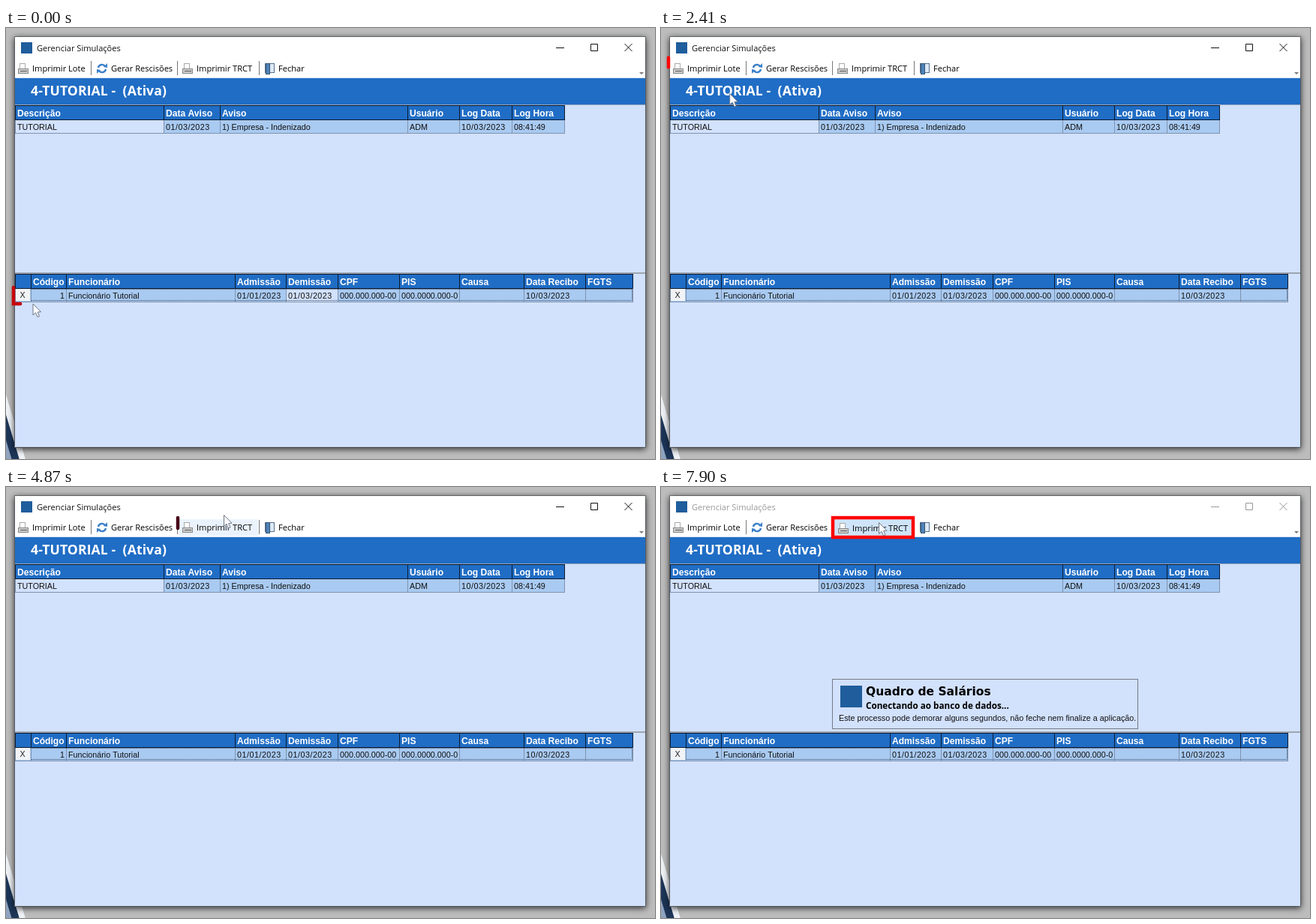
These frames come from a looping animation (865x575 px, 8000 ms). An HTML page with a canvas:

```html
<!DOCTYPE html>
<html lang="pt-BR">
<head>
<meta charset="utf-8">
<style>
html, body { margin: 0; width: 100%; height: 100%; overflow: hidden; background: #bbb }
canvas { display: block }
</style>
</head>
<body>
<canvas id="stage" width="865" height="575"></canvas>
<script>
const ctx = document.getElementById('stage').getContext('2d');
const W = 865, H = 575, LOOP = 8000, DRAW_TIME = 1060, DIALOG_AT = 7690;
const PALE = '#d2e1fc', BLUE = '#206dc5', ROW = '#a9caf1', LOGO = '#1f5d9c';
const UI = '11.1px "Open Sans", sans-serif';
const CELL = '10.75px "Liberation Sans", Arial, sans-serif';
const HEAD = 'bold 12.1px "Liberation Sans", Arial, sans-serif';

// Heading, column width, value
const NOTICE = [
  ['Descrição', 198, 'TUTORIAL'], ['Data Aviso', 75, '01/03/2023'],
  ['Aviso', 250, '1) Empresa - Indenizado'], ['Usuário', 69, 'ADM'],
  ['Log Data', 70, '10/03/2023'], ['Log Hora', 70, '08:41:49']
];
const STAFF = [
  ['', 21, ''], ['Código', 47, '1'], ['Funcionário', 225, 'Funcionário Tutorial'],
  ['Admissão', 68, '01/01/2023'], ['Demissão', 69, '01/03/2023'],
  ['CPF', 82, '000.000.000-00'], ['PIS', 80, '000.0000.000-0'], ['Causa', 86, ''],
  ['Data Recibo', 82, '10/03/2023'], ['FGTS', 63, '']
];

// Pointer tip: start, duration, destination
const MOVES = [
  [910, 270, 30, 346], [2090, 470, 98, 58], [3330, 270, 89, 57],
  [4190, 70, 87, 69], [4800, 1, 290, 37], [5000, 570, 290, 47]
];

const POINTER = new Path2D('M.5.5v15l3.5-3.2 2.5 5.7 2.5-1-2.3-5.5 4.3-.3z');

const clamp = v => Math.max(0, Math.min(1, v));
const progress = (t, start, duration) => clamp((t - start) / duration);
const bold = size => `bold ${size}px "Open Sans", sans-serif`;

function rect(x, y, w, h, fill) {
  ctx.fillStyle = fill;
  ctx.fillRect(x, y, w, h);
}

function panel(x, y, w, h, fill, border) {
  rect(x, y, w, h, border);
  rect(x + 1, y + 1, w - 2, h - 2, fill);
}

function stroke(path, color, width = 1) {
  ctx.strokeStyle = color;
  ctx.lineWidth = width;
  ctx.stroke(new Path2D(path));
}

function text(str, x, y, font, color = '#000', spacing = 0) {
  ctx.font = font;
  ctx.letterSpacing = spacing + 'px';
  ctx.fillStyle = color;
  ctx.fillText(str, x, y);
  return ctx.measureText(str).width;
}

function backdrop() {
  rect(0, 0, W, H, '#bcbcbc');
  [['#eef1f5', 489], ['#1d3557', 516], ['#8fa3bf', 550]].forEach(([color, y]) => {
    ctx.fillStyle = color;
    ctx.fill(new Path2D(`M0 ${y}L${(H - y) * 0.3} ${H}H0z`));
  });
  ctx.save();
  ctx.shadowColor = 'rgba(0,0,0,.45)';
  ctx.shadowBlur = 8;
  ctx.shadowOffsetY = 2;
  panel(11, 11, 842, 549, PALE, '#6d7278');
  ctx.restore();
  rect(12, 12, 840, 547, PALE);
  rect(12, 12, 840, 54, '#fff');
}

function titleBar(inactive) {
  const ink = inactive ? '#999' : '#111';
  rect(20, 19, 15, 15, LOGO);
  text('Gerenciar Simulações', 41, 31, UI, ink);
  stroke('M733 26.5h11M779.5 21.5h9v9h-9zM824.5 21l10 10m0-10l-10 10', ink);
}

function printer(x, y) {
  panel(x + 2, y, 8, 9, '#fff', '#aaa');
  panel(x, y + 7, 14, 7, '#ccc', '#888');
  rect(x + 3, y + 10, 9, 1, '#555');
}

function refreshIcon() {
  for (const turn of [0, Math.PI]) {
    ctx.save();
    ctx.translate(128, 54);
    ctx.rotate(turn);
    stroke('M-5 -1A5 5 0 0 1 4 -3', '#3b7fc8', 2.4);
    ctx.fillStyle = '#3b7fc8';
    ctx.fill(new Path2D('M2 -2l5 -5v6z'));
    ctx.restore();
  }
}

function toolbar([x, y], pressed) {
  const push = pressed ? 1 : 0;
  if (y < 66) {
    if (x < 114) rect(13, 43, 100, 22, '#f2f7fd');
    else rect(231, 43, 105, 22, pressed ? '#cfe4f8' : '#eaf3fd');
  }
  printer(16, 47);
  text('Imprimir Lote', 35, 58, UI);
  refreshIcon();
  text('Gerar Rescisões', 140, 58, UI);
  printer(235 + push, 47 + push);
  text('Imprimir TRCT', 254 + push, 58 + push, UI);
  panel(345, 47, 13, 13, '#dce9f5', '#58718d');
  panel(346, 47, 6, 15, '#4e83b9', '#3a5674');
  text('Fechar', 363, 58, UI);
  [113, 228, 337].forEach(s => rect(s, 44, 1, 19, '#777'));
  ctx.fill(new Path2D('M844 59h6l-3 3z'));
}

function cell(str, x, y, width, struck) {
  const ink = struck ? '#d8485c' : '#111';
  const left = str === '1' ? x + width - 9 : x + 2;
  const length = text(str, left, y, CELL, ink, str.includes('/') ? 0.5 : 0);
  if (struck) rect(left, y - 4, length, 1, ink);
}

function table(columns, top, paleHead, struck) {
  const total = columns.reduce((sum, c) => sum + c[1], 0);
  rect(12, top - 1, total + 1, 20, '#0b1a30');
  rect(12, top + 19, total + 1, 18, '#7f93af');
  let x = 13;
  for (const [head, width, value] of columns) {
    rect(x, top, width - 1, 18, BLUE);
    rect(x, top + 19, width - 1, 17, head === paleHead ? PALE : ROW);
    text(head, x + 2, top + 14, HEAD, '#fff');
    cell(value, x, top + 32, width, struck);
    x += width;
  }
}

function staffTable(t) {
  const struck = t >= 560 && t < 1450;
  table(STAFF, 329, t < 560 ? 'Demissão' : null, struck);
  rect(13, 348, 19, 16, '#f1f3f6');
  text('X', 18.5, 360, struck ? HEAD : CELL, '#222');
  ctx.setLineDash([1, 1]);
  stroke('M33 348.5H834.5V363.5H33', '#33445c');
  ctx.setLineDash([]);
}

function dialog() {
  panel(228, 256, 408, 67, PALE, '#737b88');
  rect(239, 265, 29, 29, LOGO);
  text('Quadro de Salários', 273, 278, 'bold 15.5px "DejaVu Sans", sans-serif');
  text('Conectando ao banco de dados...', 273, 296, bold(11.7));
  text('Este processo pode demorar alguns segundos, não feche nem finalize a aplicação.',
    237, 312, CELL, '#111');
}

// A red outline that draws itself counterclockwise from its top left corner.
function highlight(t, x, y, w, h, start, fadeStart, fadeTime, startInk) {
  if (t < start) return;
  const p = progress(t, start, DRAW_TIME);
  const length = 2 * (w + h);
  const glow = clamp(startInk + p * 2);
  ctx.save();
  ctx.globalAlpha = 1 - progress(t, fadeStart, fadeTime);
  if (p < 1) {
    ctx.lineCap = 'round';
    ctx.setLineDash([p * length, length * 2]);
  }
  stroke(`M${x} ${y}v${h}h${w}v${-h}z`, `rgb(${25 + 228 * glow},4,${26 - 20 * glow})`, 4.5);
  ctx.restore();
}

function pointerAt(t) {
  return MOVES.reduce(([x, y], [start, duration, toX, toY]) => {
    const k = 1 - (1 - progress(t, start, duration)) ** 2;
    return [x + (toX - x) * k, y + (toY - y) * k];
  }, [35.5, 367.5]);
}

function drawPointer([x, y]) {
  ctx.save();
  ctx.translate(x, y);
  ctx.fillStyle = '#fafcff';
  ctx.strokeStyle = '#6f7684';
  ctx.lineWidth = 1;
  ctx.fill(POINTER);
  ctx.stroke(POINTER);
  ctx.restore();
}

function draw(t) {
  const pointer = pointerAt(t);
  const waiting = t >= DIALOG_AT;
  backdrop();
  titleBar(waiting);
  toolbar(pointer, waiting);
  rect(12, 67, 840, 35, BLUE);
  text('4-TUTORIAL -  (Ativa)', 33, 90, bold(17.6), '#fff', 0.1);
  rect(12, 102, 840, 1, '#9aa9bd');
  table(NOTICE, 104, 'Descrição');
  rect(12, 326, 840, 2, '#9da5b0');
  staffTable(t);
  if (t >= DIALOG_AT + 70) dialog();
  highlight(t, 10, 346, 25, 22, -350, 910, 270, 0.1);
  highlight(t, 10, 39.5, 104, 27.5, 2360, 4190, 70, 1);
  highlight(t, 229, 41, 107, 26, 4815, LOOP, 1, 0.1);
  drawPointer(pointer);
}

function tick() {
  draw(performance.now() % LOOP);
  requestAnimationFrame(tick);
}
tick();
</script>
</body>
</html>
```
